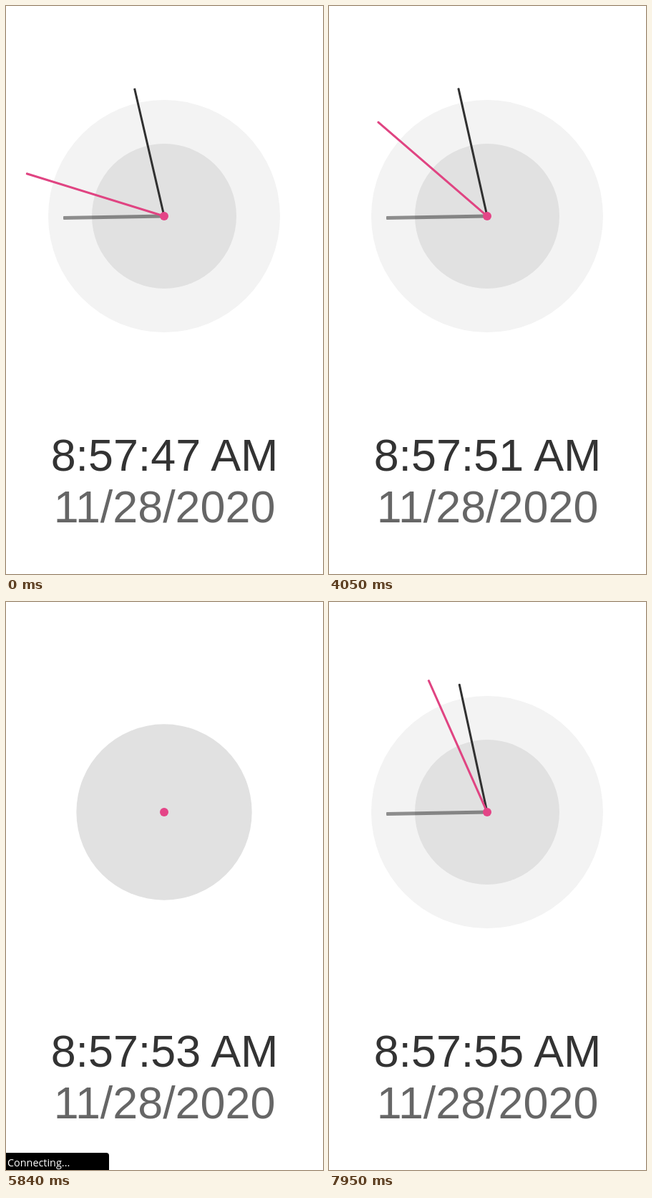
An HTML page that plays this animation: 443 px wide and 792 px high, repeating every 7990 ms.

```html
<!DOCTYPE html>
<html lang="en">
<head>
<meta charset="utf-8">
<title>Clock</title>
<style>
  html, body { margin: 0; width: 100%; height: 100%; overflow: hidden; background: #fff; }
  svg { display: block; width: 443px; height: 792px; }
  .label { font: 62.8px "Liberation Sans", Arial, sans-serif; text-anchor: middle; }
  .status { font: 14.4px "Open Sans", "Noto Sans", sans-serif; fill: #fff; }
</style>
</head>
<body>
<svg viewBox="0 0 443 792">
  <defs>
    <radialGradient id="soft">
      <stop offset=".7" stop-color="#000" stop-opacity=".25"/>
      <stop offset="1" stop-color="#000" stop-opacity="0"/>
    </radialGradient>
  </defs>
  <g id="clock">
    <g transform="translate(221 293)">
      <circle id="outer" r="162" fill="#f3f3f3"/>
      <circle id="inner" r="101" fill="#e1e1e1"/>
      <rect id="hour" x="-2.5" y="-141" width="5" height="141" rx="1" fill="#333" fill-opacity=".53"/>
      <rect id="minute" x="-1.5" y="-183" width="3" height="183" rx="1" fill="#303030"/>
      <rect id="second" x="-1.5" y="-202" width="3" height="202" rx="1" fill="#e04482"/>
      <circle r="6" fill="#e44587"/>
    </g>
    <text id="time" class="label" x="221.5" y="648" fill="#333"></text>
    <text class="label" x="221.5" y="720" fill="#666">11/28/2020</text>
  </g>
  <circle id="touch" cx="218" cy="749" r="14" fill="url(#soft)"/>
  <g id="status">
    <path d="M0 768H140q4 0 4 4V792H0Z"/>
    <text class="status" x="2" y="787">Connecting...</text>
  </g>
</svg>
<script>
const LOOP = 7990, UNLOAD = 5230, LOAD = 5530, STEP = 77.3;
const TICK = 1005, FIRST_TICK = 568, TURN = 510;

// Second hand sweep after loading: [ms, degrees]
const SWEEP = [[5600, 0], [6000, 40], [6200, 94], [6380, 144], [6530, 188], [6690, 233],
  [6840, 268], [7000, 296], [7200, 316], [7450, 329], [7690, 334.5], [7900, 336]];

// Start of each part's springy entrance
const ENTER = { inner: 5650, outer: 5840, minute: 6110, second: 6230, hour: 6333 };

const el = id => document.getElementById(id);
const show = (id, on) => el(id).setAttribute("visibility", on ? "visible" : "hidden");
const clamp = x => Math.max(0, Math.min(1, x));

function spring(ms) {
  if (ms <= 0) return 0;
  const s = ms / 1000;
  return 1 - Math.exp(-5.3 * s) * Math.cos(11.6 * s);
}

function track(points, t) {
  if (t <= points[0][0]) return points[0][1];
  for (let i = 1; i < points.length; i++) {
    const [t0, a] = points[i - 1], [t1, b] = points[i];
    if (t < t1) return a + (b - a) * (t - t0) / (t1 - t0);
  }
  return points[points.length - 1][1];
}

function secondAt(t) {
  if (t >= LOAD) return 53 + (t >= 6530) + (t >= 7535);
  return 48 + Math.floor((t - FIRST_TICK) / TICK);
}

function secondAngle(t) {
  if (t >= LOAD - 10) return track(SWEEP, t);
  const n = secondAt(t);
  const start = FIRST_TICK + (n - 48) * TICK;
  return 6 * (n + clamp((t - start) / TURN));
}

function draw(t) {
  const q = Math.max(0, LOAD + Math.floor((t - LOAD + 8) / STEP) * STEP);
  const loaded = t >= LOAD;
  const sec = secondAt(t);
  const lag = loaded ? 2.3 * Math.exp((6380 - q) / 150) : 0;
  const angles = {
    inner: 0,
    outer: 0,
    hour: 269,
    minute: 342.1 + (sec + 1) / 10 - Math.min(lag, 12),
    second: secondAngle(q)
  };
  for (const id in ENTER) {
    const size = loaded ? spring(q - ENTER[id]) : 1;
    el(id).setAttribute("transform", `rotate(${angles[id]}) scale(${size})`);
  }
  el("time").textContent = `8:57:${sec} AM`;
  show("clock", t < UNLOAD || loaded);
  show("touch", t >= 340 && t < 420);
  show("status", t >= 4990 && t < 6150);
}

const begin = performance.now();
function frame() {
  draw((performance.now() - begin) % LOOP);
  requestAnimationFrame(frame);
}
frame();
</script>
</body>
</html>
```
